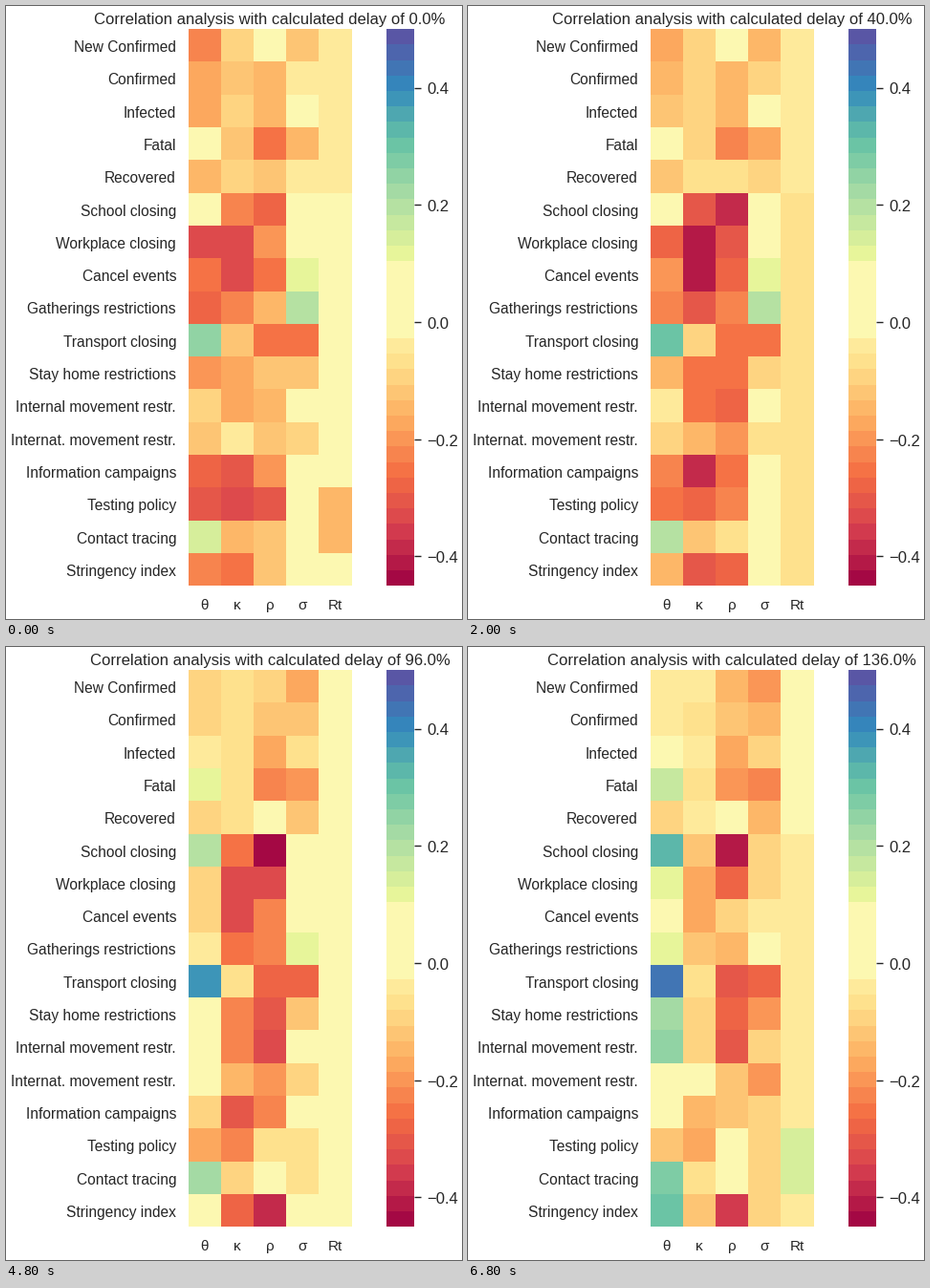
These frames come from a looping animation (477 by 642 pixels, 7000 ms). A matplotlib script:

```python
import numpy as np
import matplotlib
import matplotlib.pyplot as plt
from matplotlib.animation import FuncAnimation
from matplotlib.colors import BoundaryNorm, ListedColormap

W, H, DPI = 477, 642, 64
FRAMES, INTERVAL = 35, 200
LEFT, RIGHT, TOP, BOTTOM = 190.8, 361.5, 24.17, 607.17
BAR_LEFT, BAR_RIGHT = 398, 427
V_MIN, V_MAX = -0.45, 0.5
BANDS = 36
PALE, PALE_BANDS = (0.987, 0.973, 0.695), slice(16, 21)
INK = "#262626"
COLUMNS = ["θ", "κ", "ρ", "σ", "Rt"]

# In hundredths: theta from, theta to, kappa from, rho from, rho to, sigma from
CASES = {
    "New Confirmed": (-22, -5, -10, 2, -14, -12),
    "Confirmed": (-17, -5, -12, -15, -12, -5),
    "Infected": (-18, 2, -10, -14, -17, 2),
    "Fatal": (2, 16, -12, -25, -20, -14),
    "Recovered": (-14, -9, -9, -12, 2, -5),
}
MEASURES = {
    "School closing": (2, 33, -22, -28, -40, 2),
    "Workplace closing": (-34, 11, -34, -20, -27, 2),
    "Cancel events": (-24, 2, -34, -24, -10, 11),
    "Gatherings restrictions": (-27, 11, -22, -14, -14, 19),
    "Transport closing": (25, 43, -12, -24, -31, -24),
    "Stay home restrictions": (-20, 22, -17, -12, -27, -12),
    "Internal movement restr.": (-10, 24, -17, -15, -31, 2),
    "Internat. movement restr.": (-12, 6, -5, -12, -12, -10),
    "Information campaigns": (-27, 2, -31, -20, -12, 2),
    "Testing policy": (-31, -12, -34, -31, 2, 2),
    "Contact tracing": (15, 27, -15, -12, 2, 2),
    "Stringency index": (-22, 30, -24, -12, -37, 2),
}
ROWS = {**CASES, **MEASURES}
TRACING = {"Testing policy", "Contact tracing"}
STEADY = {*CASES, *TRACING, "Transport closing"}


def mix(a, b, t):
    return a + (b - a) * t


def rt_at(name, t):
    if name in CASES:
        return mix(-5, 2, t)
    if name in TRACING:
        return mix(-14, 15, t)
    return 2 - 8 * max(0, np.sin(2 * np.pi * t)) - 6 * t ** 4


def row_values(name, t):
    """Steady rows drift evenly; the others also swing out midway."""
    theta0, theta1, kappa0, rho0, rho1, sigma0 = ROWS[name]
    steady = name in STEADY
    swing = 0 if steady else np.sin(np.pi * t)
    return [mix(theta0, theta1, t if steady else t ** 1.6),
            mix(kappa0, kappa0 / 2, t) - 14 * swing,
            mix(rho0, rho1, t) - 10 * swing,
            mix(sigma0, 0.7 * sigma0 - 12, t) + 8 * swing,
            rt_at(name, t)]


def grid_at(step):
    t = step / (FRAMES - 1)
    return np.array([row_values(name, t) for name in ROWS]) / 100


def y_of(value):
    return TOP + (V_MAX - value) / (V_MAX - V_MIN) * (BOTTOM - TOP)


def centers(edges):
    return (edges[:-1] + edges[1:]) / 2


def label(x, y, text, px, **align):
    return ax.text(x, y, text, fontsize=px * 72 / DPI, color=INK, **align)


plt.rcParams["font.family"] = "Liberation Sans"
fig = plt.figure(figsize=(W / DPI, H / DPI), dpi=DPI, facecolor="white")
ax = fig.add_axes([0, 0, 1, 1])
ax.set_xlim(0, W)
ax.set_ylim(H, 0)
ax.axis("off")
ax.set_autoscale_on(False)

# Spectral in even bands, with one wide pale band around zero.
band_edges = np.linspace(V_MIN, V_MAX, BANDS + 1)
colors = matplotlib.colormaps["Spectral"]((np.arange(BANDS) + 0.5) / BANDS)
colors[PALE_BANDS, :3] = PALE
style = dict(cmap=ListedColormap(colors), norm=BoundaryNorm(band_edges, BANDS))

x_edges = np.linspace(LEFT, RIGHT, len(COLUMNS) + 1)
y_edges = np.linspace(TOP, BOTTOM, len(ROWS) + 1)
heat = ax.pcolormesh(x_edges, y_edges, grid_at(0), **style)
ax.pcolormesh([BAR_LEFT, BAR_RIGHT], y_of(band_edges),
              centers(band_edges)[:, None], **style)

for name, y in zip(ROWS, centers(y_edges)):
    label(178, y + 0.8, name, 15.5, ha="right", va="center_baseline")
for name, x in zip(COLUMNS, centers(x_edges)):
    label(x, 620.7, name, 15.3, ha="center", va="top")
for value in (0.4, 0.2, 0.0, -0.2, -0.4):
    y = y_of(value)
    ax.plot([BAR_RIGHT, 434], [y, y], color=INK, lw=1.4 * 72 / DPI,
            solid_capstyle="butt")
    label(440.2, y + 0.8, f"{value:.1f}".replace("-", "\u2212"), 16.67,
          ha="left", va="center_baseline")
title = label((LEFT + RIGHT) / 2, 19, "", 16.67, ha="center", va="baseline")


def update(step):
    heat.set_array(grid_at(step))
    title.set_text(
        f"Correlation analysis with calculated delay of {4 * step:.1f}%")
    return heat, title


anim = FuncAnimation(fig, update, frames=FRAMES, interval=INTERVAL,
                     repeat=True, repeat_delay=0)
plt.show()
```
